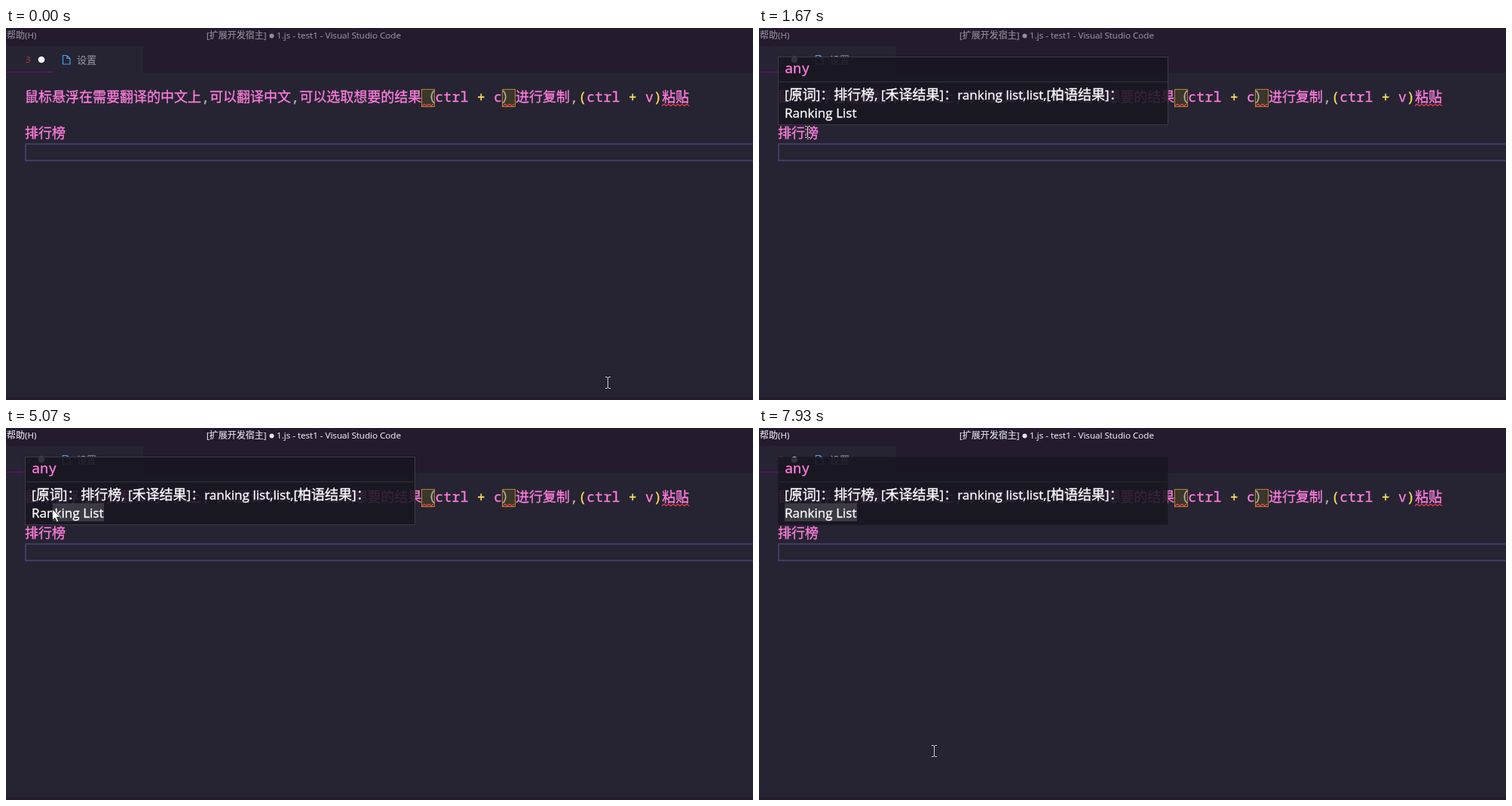
Recreate the animation shown at these times as an HTML page. Size 991 by 494 pixels, loop 8000 ms.

```html
<!DOCTYPE html>
<html lang="zh-CN">
<head>
<meta charset="utf-8">
<title>悬浮翻译</title>
<style>
html, body { margin: 0; width: 100%; height: 100%; overflow: hidden; background: #262433; }
svg { display: block; }
text, tspan { white-space: pre; fill: currentColor; stroke: currentColor; stroke-width: .3; }
.mono { font: 18.5px "Noto Sans Mono", "DejaVu Sans Mono", monospace; color: #ff7edb; }
.ui { font: 17.1px "Open Sans", "Noto Sans", sans-serif; color: #fff; }
.bar { font: 11.6px "Open Sans", "Noto Sans", sans-serif; color: #938e98; fill: currentColor; }
.bar text, .bar tspan { stroke-width: .15; }
.bar.focus { color: #e6e4e8; }
.cn { font-family: "Noto Sans CJK SC", "Noto Sans CJK", sans-serif; font-size: 18px; }
.bar .cn { font-size: 12px; }
.tab { font-size: 13px; color: #97939f; stroke-width: .1; }
.count { color: #a83a48; stroke-width: .1; }
.sep { color: #b6b1b1; }
.op { color: #fede5d; }
.warn { fill: #bd9b0326; stroke: #b5832a; }
.wave { fill: none; stroke: #f0424d; stroke-width: 1.2; }
.pane { fill: #171520; fill-opacity: .87; stroke: #3c3b46; }
.plain .pane { stroke: none; }
.plain .rule { stroke: #2a2933; }
.rule { stroke: #34333d; }
</style>
</head>
<body>
<svg width="991" height="494" viewBox="0 0 991 494">
  <rect width="991" height="494" fill="#262433"/>
  <path d="M0 0H991V59H182V24H0zM0 490H991V494H0z" fill="#241b2f"/>

  <g id="bar" class="bar">
    <text x="1" y="14"><tspan class="cn">帮助</tspan>(H)</text>
    <text x="266" y="14">[<tspan class="cn">扩展开发宿主</tspan>]</text>
    <circle cx="352.5" cy="10.5" r="3"/>
    <text x="359" y="14">1.js - test1 - Visual Studio Code</text>
  </g>

  <text class="bar count" x="26" y="46">3</text>
  <circle cx="47" cy="42" r="4.3" fill="#fff"/>
  <rect y="58" width="62" height="1" fill="#880088"/>
  <path d="M75.5 36.5H81L85 40.5V48H75.5zM81 36.5V40.5H85" fill="none" stroke="#4a9fe0" stroke-width="1.2"/>
  <text class="cn tab" x="94" y="47">设置</text>

  <rect x="26" y="154" width="980" height="22" fill="none" stroke="#443a64" stroke-width="2"/>
  <rect id="word" x="25" y="128" width="54" height="25" fill="#463564"/>
  <rect class="warn" x="551.5" y="81.5" width="17" height="23"/>
  <rect class="warn" x="658.5" y="81.5" width="17" height="23"/>
  <text class="mono" x="25" y="98"><tspan class="cn">鼠标悬浮在需要翻译的中文上</tspan><tspan class="sep">,</tspan><tspan class="cn">可以翻译中文</tspan><tspan class="sep">,</tspan><tspan class="cn">可以选取想要的结果</tspan><tspan class="cn sep">（</tspan>ctrl <tspan class="op">+</tspan> c<tspan class="cn sep">）</tspan><tspan class="cn">进行复制</tspan><tspan class="sep">,</tspan><tspan class="op">(</tspan>ctrl <tspan class="op">+</tspan> v<tspan class="op">)</tspan><tspan class="cn">粘贴</tspan></text>
  <path class="wave" d="M552 103.5l3-2.5 3 2.5 3-2.5 3 2.5 3-2.5M659 103.5l3-2.5 3 2.5 3-2.5 3 2.5 3-2.5M870 103.5l3-2.5 3 2.5 3-2.5 3 2.5 3-2.5 3 2.5 3-2.5 3 2.5 3-2.5 3 2.5 3-2.5 3 2.5"/>
  <text class="mono cn" x="25" y="146">排行榜</text>

  <g id="small">
    <rect class="pane" x="25.5" y="95.5" width="50" height="33"/>
    <text class="mono" x="34" y="117">any</text>
  </g>

  <g id="hover">
    <rect class="pane" x="25.5" y="38.5" width="517" height="90"/>
    <path class="rule" d="M26 71.5H542"/>
    <rect id="pick" y="100" height="24" fill="#fff" fill-opacity=".15"/>
    <text class="mono" x="34" y="60">any</text>
    <text class="ui" x="34" y="95">[<tspan class="cn">原词</tspan>]<tspan class="cn">：排行榜</tspan>, [<tspan class="cn">禾译结果</tspan>]<tspan class="cn">：</tspan>ranking list,list,[<tspan class="cn">柏语结果</tspan>]<tspan class="cn">：</tspan></text>
    <text class="ui" x="34" y="119">Ranking List</text>
  </g>

  <path id="arrow" d="M-.5 .5V15.5l3.4-3.2 2.5 5.6 2.4-1-2.5-5.5h4.6z" fill="#fff" stroke="#111" stroke-width=".8"/>
  <g id="beam" fill="none">
    <path d="M-3-7.5H-1L.5-6.5 2-7.5H4M.5-6.5V6.5M-3 7.5H-1L.5 6.5 2 7.5H4" stroke="#15131c" stroke-width="2.5"/>
    <path d="M-3-7.5H-1L.5-6.5 2-7.5H4M.5-6.5V6.5M-3 7.5H-1L.5 6.5 2 7.5H4" stroke="#e4e4e4"/>
  </g>
</svg>
<script>
const LOOP = 8000, TICK = 1000 / 15;
const $ = id => document.getElementById(id);
const show = (id, on) => { $(id).style.display = on ? '' : 'none'; };

// Pointer stops: tick, x, y
const path = [
  [0, 798, 471], [13, 90, 138], [15, 64, 138], [38, 64, 138],
  [44, 342, 98], [51, 342, 98], [52, 351, 98], [53, 373, 99],
  [55, 373, 99], [66, 151, 110], [70, 151, 110], [79, 31, 106],
  [109, 31, 106], [116, 248, 431], [119, 232, 429]
];

function pointer(k) {
  const i = path.findIndex(p => p[0] > k);
  if (i < 0) return path[path.length - 1].slice(1);
  const [k0, x0, y0] = path[i - 1], [k1, x1, y1] = path[i];
  const p = (k - k0) / (k1 - k0), e = p * p * (3 - 2 * p);
  return [Math.round(x0 + (x1 - x0) * e), Math.round(y0 + (y1 - y0) * e)];
}

function draw(t) {
  const k = Math.floor((t + 4) / TICK) % 120;
  const [x, y] = pointer(k);
  const inHover = k >= 25 && y < 129 && x < 543;

  show('arrow', inHover);
  show('beam', !inHover);
  $(inHover ? 'arrow' : 'beam').setAttribute('transform', `translate(${x} ${y})`);

  const peek = k >= 20 && k < 25;
  show('word', peek);
  show('small', peek);
  $('small').style.opacity = k === 20 ? .5 : 1;
  show('hover', k >= 25);
  $('hover').classList.toggle('plain', k >= 88);

  $('bar').classList.toggle('focus', k >= 71);
  const left = k < 71 ? 130 : k >= 79 ? 34 : Math.min(130, Math.max(34, x));
  $('pick').setAttribute('x', left);
  $('pick').setAttribute('width', 130 - left);
}

const start = performance.now();
function frame() {
  draw((performance.now() - start) % LOOP);
  requestAnimationFrame(frame);
}
frame();
</script>
</body>
</html>
```
